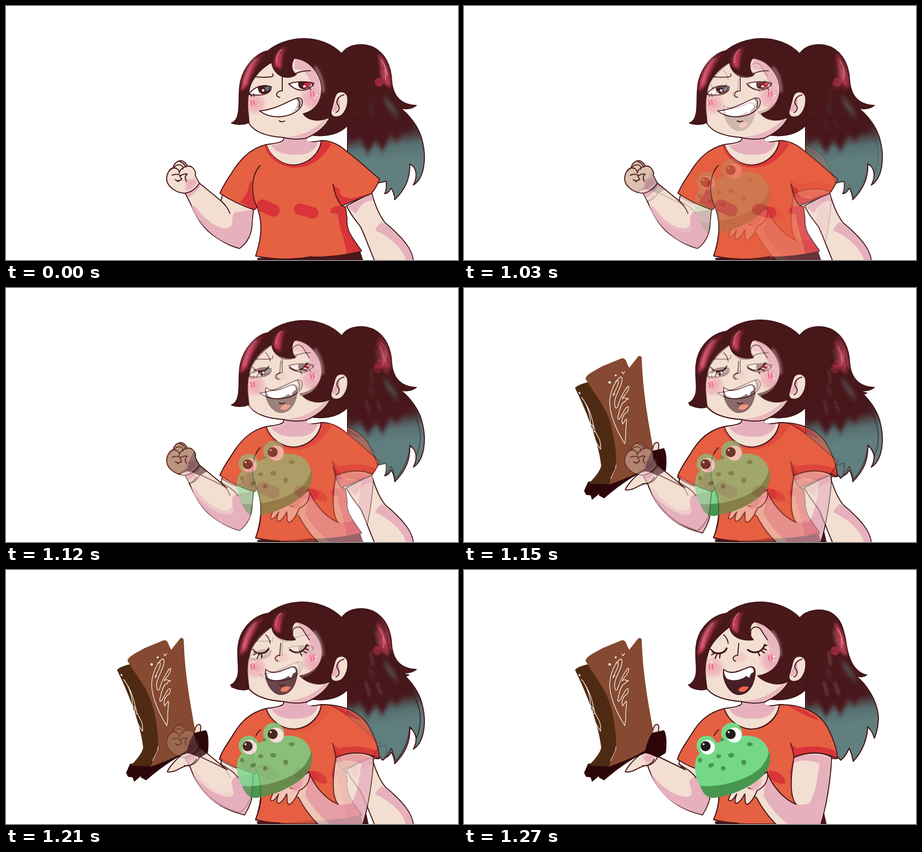
Animation, 900 px wide and 506 px high, one loop 2.27 s. Source, as an HTML page:

```html
<!DOCTYPE html>
<html lang="en">
<head>
<meta charset="utf-8">
<title>Two poses</title>
<style>
html, body { margin: 0; width: 100%; height: 100%; overflow: hidden; background: #fff; }
svg { display: block; width: 100vw; height: 100vh; }
.ln { fill: none; }
.ink, .ln { stroke: #421619; stroke-width: 2; stroke-linecap: round; stroke-linejoin: round; }
.skin { fill: #f3dfd2; }
.pink { fill: #e7b0bd; }
.hair { fill: #48181b; }
.shirt { fill: #e66042; }
.red { fill: #d93438; }
.white { fill: #fff; }
.mark { fill: none; stroke: #ee4a6c; stroke-width: 1.7; stroke-linecap: round; }
.soft { filter: url(#blur); }
.scroll { fill: none; stroke: #f6ebe2; stroke-width: 1.4; stroke-linecap: round; stroke-linejoin: round; }

/* the second pose dissolves over the first in ten 30 ms steps */
#first { animation: leave 2270ms step-end infinite; }
#second { animation: fade 2270ms step-end infinite; }
#fresh { animation: arrive 2270ms step-end infinite; }
@keyframes leave { 0% { opacity: 1; } 55.93%, 100% { opacity: 0; } }
@keyframes arrive { 0% { opacity: 0; } 50.65%, 100% { opacity: 1; } }
@keyframes fade {
  0% { opacity: 0; }
  44.04% { opacity: .1; animation-timing-function: steps(9, end); }
  55.93%, 100% { opacity: 1; }
}
</style>
</head>
<body>
<svg viewBox="0 0 900 506" preserveAspectRatio="none">
<defs>
  <filter id="blur" x="-50%" y="-50%" width="200%" height="200%"><feGaussianBlur stdDeviation="2.5"/></filter>
  <filter id="haze" x="-50%" y="-50%" width="200%" height="200%"><feGaussianBlur stdDeviation="3 6"/></filter>
  <linearGradient id="tail" gradientUnits="userSpaceOnUse" x1="742" y1="236" x2="750" y2="308">
    <stop offset="0" stop-color="#48181b"/><stop offset=".25" stop-color="#49282b"/>
    <stop offset=".65" stop-color="#587071"/><stop offset="1" stop-color="#617f7f"/>
  </linearGradient>
  <radialGradient id="blush">
    <stop offset="0" stop-color="#eda3b0" stop-opacity=".95"/><stop offset=".6" stop-color="#eeb2bb" stop-opacity=".7"/>
    <stop offset="1" stop-color="#f3dfd2" stop-opacity="0"/>
  </radialGradient>
  <linearGradient id="shine" x1="0" y1="1" x2="1" y2="0">
    <stop offset="0" stop-color="#cf3f5d"/><stop offset=".5" stop-color="#b93550"/><stop offset="1" stop-color="#48181b"/>
  </linearGradient>

  <path id="faceA" d="M484 234C482 214 480 190 484 168C487 148 505 125 529 112C531 130 545 142 560 142C567 142 574 140 578 136C568 131 566 116 574 104C602 106 625 132 628 160C630 186 616 209 592 215C601 228 623 232 645 221C638 238 621 253 598 263Q575 268 553 262C522 260 495 252 484 234Z"/>
  <path id="faceB" d="M484 237C479 212 480 185 486 165C491 146 508 129 529 113C531 131 548 142 576 139C566 129 567 109 578 103C606 107 630 137 630 164C630 187 611 207 585 211C599 225 627 233 647 221C638 239 621 253 598 263Q575 268 553 262C522 260 497 253 484 237Z"/>
  <path id="tailA" d="M667 97C680 75 710 73 731 82C756 95 767 121 768 150C771 181 787 197 817 198C807 206 794 206 784 203C804 216 824 245 829 269C838 306 832 344 811 357C820 340 818 321 804 315C805 342 796 364 774 386C774 377 770 367 767 363C763 370 760 373 754 374C759 365 757 356 757 349L739 353L680 300V236L650 230Z"/>
  <path id="tailB" d="M667 97C681 79 711 75 732 86C752 99 755 118 760 140C764 174 775 204 802 209C795 214 785 213 779 210C803 229 822 260 825 291C825 308 822 324 817 335C814 325 809 317 804 312C802 341 791 364 775 381C773 368 770 361 767 355C761 367 757 374 750 379L680 300V236L650 230Z"/>
  <clipPath id="inFaceA"><use href="#faceA"/></clipPath>
  <clipPath id="inFaceB"><use href="#faceB"/></clipPath>
  <clipPath id="inTailA"><use href="#tailA"/></clipPath>
  <clipPath id="inTailB"><use href="#tailB"/></clipPath>

  <!-- parts both poses share -->
  <g id="neck">
    <path class="skin ink" d="M553 250V265C553 272 534 274 518 276C526 302 552 317 573 317C604 315 625 292 628 268C614 271 597 273 597 267L602 250Z"/>
    <path class="pink" d="M554 262L597 262C598 273 613 271 621 272C616 284 608 292 594 295C565 299 538 295 528 277C545 276 556 272 554 262Z"/>
  </g>
  <g id="shines">
    <path class="soft" fill="url(#shine)" d="M468 170C469 132 489 100 521 90C508 104 491 126 481 158Z"/>
    <path class="soft" fill="none" stroke="#e9b3ba" stroke-width="3" opacity=".7" d="M475 156C479 133 487 116 499 104"/>
    <path class="soft" fill="url(#shine)" d="M535 119C532 98 545 81 563 82C551 91 547 110 548 126Z"/>
    <path fill="none" stroke="#e8909d" stroke-width="2" opacity=".75" d="M539 113C538 99 543 91 550 86"/>
    <path class="soft" fill="none" stroke="#e3bdc0" stroke-width="4" opacity=".7" d="M615 121Q631 140 632 172"/>
  </g>
  <g id="ear">
    <path class="skin ink" d="M655 181C659 168 675 167 680 180C683 199 673 222 657 221C649 221 645 215 648 207Z"/>
    <path class="pink" d="M650 211C662 210 668 196 662 181C655 187 654 201 648 208Z"/>
    <path class="ln" d="M673 177C661 179 656 191 661 197C665 201 664 209 657 212"/>
  </g>
  <g id="tailShine">
    <path class="soft" fill="#b23a50" d="M741 94C757 106 768 137 766 163C753 157 744 145 746 128Z"/>
    <circle fill="#a92c45" cx="743" cy="152" r="9" opacity=".8"/>
    <path fill="none" stroke="#ecb0b5" stroke-width="1.5" opacity=".75" d="M748 108Q757 122 759 139M755 125L756 146"/>
  </g>
  <g id="streaks" filter="url(#haze)">
    <path fill="#48181b" d="M681 232L800 228L808 252L791 250L778 268L765 254L750 290L736 266L720 294L704 258L684 272Z"/>
    <path fill="#627f80" opacity=".65" d="M750 180C762 188 775 205 782 221C769 214 756 198 750 180ZM722 190L733 215L726 207Z"/>
  </g>

  <g id="poseA">
    <use href="#tailA" class="ink" fill="url(#tail)"/>
    <g clip-path="url(#inTailA)"><use href="#streaks"/><use href="#tailShine"/></g>
    <path class="hair ink" d="M669 96C650 75 619 64 590 65C560 66 536 77 522 89C497 94 474 121 467 150C462 170 466 198 462 215C460 226 456 231 449 233C461 238 475 236 484 232L600 256C634 262 662 257 681 237L690 130Z"/>
    <!-- far arm -->
    <path class="skin ink" d="M678 398C686 416 699 430 706 440C714 456 724 485 735 510H811C811 483 783 455 755 432C743 417 735 397 728 372Z"/>
    <path class="pink" d="M680 400L726 375L730 388C715 387 704 398 697 414ZM748 430C785 457 808 483 810 506H796C791 484 764 459 735 447C738 439 742 436 748 430Z"/>
    <path class="hair" d="M500 502L705 488L711 506H501Z"/>
    <!-- near arm and fist -->
    <path class="skin ink" d="M355 371C369 391 375 422 402 448C422 466 448 479 465 483C482 471 490 452 490 432L493 402L431 376L428 388L384 352Z"/>
    <path class="pink" d="M369 397L378 400C394 425 421 444 440 443C458 439 445 420 456 411L490 406C492 443 482 472 465 481C422 473 382 435 369 397ZM356 371L384 352L388 358C379 367 372 379 363 381Z"/>
    <path class="ln" d="M428 388C435 395 442 402 446 413"/>
    <path class="skin ink" d="M355 373C340 372 323 362 320 347C319 335 325 325 333 322C335 311 347 304 355 311Q360 315 361 319C371 317 379 328 377 338L385 353C379 363 368 372 355 373Z"/>
    <path class="pink soft" d="M358 342Q369 350 378 340L381 352Q369 366 358 369Z"/>
    <path class="ln" d="M325 329C334 317 346 325 345 333M335 321C343 313 354 316 352 325M346 310Q355 313 358 321M331 337C338 334 345 335 348 338Q355 333 361 335Q354 340 359 349M345 332C348 322 360 317 369 320M337 346Q344 351 350 345L346 339M337 346L343 350"/>
    <use href="#neck"/>
    <!-- shirt -->
    <path class="shirt ink" d="M518 276C484 284 464 309 449 333C439 348 431 360 426 373C445 386 470 398 494 406L500 401C510 426 511 457 497 498C530 505 570 506 604 500C640 501 681 496 708 488C688 460 677 447 679 424L676 400L668 398L727 374Q737 363 744 345C724 328 704 309 680 291C664 276 648 268 628 268C624 297 601 316 573 317C550 317 525 300 518 276Z"/>
    <path class="red" d="M515 278C521 304 548 321 573 322C610 323 631 301 648 275Q638 269 629 270C624 296 602 316 573 318C548 316 526 299 519 277Z"/>
    <path class="red" d="M490 347C479 356 488 369 466 391L494 405L499 400C490 385 488 368 490 347ZM652 357L665 365C662 379 676 383 690 383L729 372L668 397C659 384 654 370 652 357ZM660 398L675 401L678 427C677 446 688 461 707 488L679 493C674 465 663 441 661 415L646 412Q645 401 660 398Z"/>
    <rect class="red" x="498" y="390" width="48" height="25" rx="12.500" transform="rotate(24 522 402)"/>
    <rect class="red" x="573" y="397" width="50" height="23" rx="11.500" transform="rotate(16 598 408)"/>
    <path class="ln" d="M506 318C489 335 486 374 500 401M651 355C654 374 660 388 668 398M604 500L607 499"/>
    <!-- face -->
    <use href="#faceA" class="skin ink"/>
    <g clip-path="url(#inFaceA)">
      <path class="pink" d="M576 106C602 108 623 134 625 160C627 180 617 199 608 204C616 180 611 148 592 128L574 126ZM554 261C586 260 613 248 633 228L641 224C631 241 616 253 598 262Q573 266 554 261Z" opacity=".85"/>
      <ellipse fill="url(#blush)" cx="496" cy="195" rx="27" ry="26"/><ellipse fill="url(#blush)" cx="608" cy="181" rx="27" ry="31"/>
    </g>
    <use href="#shines"/><use href="#ear"/>
    <path class="white ink" d="M483 176C494 160 514 155 528 161C529 173 514 181 483 176ZM563 155C579 149 600 150 613 154C603 171 579 173 563 155Z"/>
    <path class="hair" d="M502 160Q515 157 526 161C528 171 518 176 509 175Q500 171 502 160ZM582 152Q596 150 608 154C602 168 587 169 582 159Z"/>
    <path fill="#557d85" d="M514 162L524 160Q526 167 519 170Z"/><path fill="#cb2848" d="M594 153L608 153Q603 162 596 164Z"/>
    <circle class="white" cx="512" cy="168" r="2.500"/><circle class="white" cx="594" cy="160" r="2.500"/>
    <path class="ln" d="M486 175L489 180M493 175L494 180M603 162L607 167M609 155L612 159M497 141Q514 143 529 141Q533 140 531 135M571 137Q588 128 606 129M550 142V168M550 169C539 168 534 180 545 182M544 229Q550 232 555 229"/>
    <path class="white ink" d="M505 209C541 205 558 191 578 184C591 179 594 194 584 205C566 223 528 227 505 209Z"/>
    <path fill="#c9c4c4" d="M582 184C592 183 590 196 583 204L568 213C579 203 583 194 579 186Z"/>
    <path class="ln" d="M579 184Q588 190 583 202"/>
    <path class="mark" d="M487 188L489 198M493 187L494 196M606 170L608 180M612 170L613 179"/>
    <path class="white" d="M484 191h2v3h-2zM617 177h3v3h-3zM614 183h2v2h-2z"/>
  </g>

  <g id="poseB">
    <use href="#tailB" class="ink" fill="url(#tail)"/>
    <g clip-path="url(#inTailB)">
      <use href="#streaks"/><use href="#tailShine" x="-4" y="9"/>
      <path fill="none" stroke="#a78988" stroke-width="4" opacity=".45" class="soft" d="M726 163L730 190M716 222L724 251M738 224L747 248M736 120L741 146"/>
    </g>
    <path class="hair ink" d="M669 96C650 75 616 62 583 64C556 66 536 76 523 86C491 91 465 119 462 153C459 176 467 202 459 217Q454 227 447 229C455 239 475 241 486 236L600 256C634 262 662 257 681 237L690 130Z"/>
    <path class="hair" d="M499 501L714 470L722 506H501Z"/>
    <!-- arm under the boots -->
    <path class="skin ink" d="M364 384C374 420 397 452 428 470Q449 482 475 488C484 474 491 456 492 438L493 400L429 375L428 386Q434 393 441 398L385 371Z"/>
    <path class="pink" d="M372 405C397 439 431 455 448 451C463 444 440 425 454 414L490 402C493 443 486 470 475 486C422 476 388 447 372 405Z"/>
    <path class="ln" d="M428 387C442 395 455 403 462 414"/>
    <use href="#neck"/>
    <!-- shirt -->
    <path class="shirt ink" d="M518 276C486 284 468 302 455 324C443 344 431 358 425 377C444 390 470 400 494 405L504 415C511 445 508 473 497 497Q532 507 575 506H712L714 470L680 373L743 376C744 358 733 331 724 314C707 282 671 268 628 268C624 297 601 316 573 317C550 317 525 300 518 276Z"/>
    <path class="red" d="M650 347L664 355Q704 346 739 360L742 374Q700 358 657 372ZM606 400C622 399 642 409 639 425Q626 429 610 415ZM649 401L656 374L665 376L667 470L652 451ZM645 270C672 273 698 289 708 300Q680 292 664 281Z"/>
    <path class="ln" d="M507 318Q501 323 498 330M650 345Q655 358 657 373C687 360 718 362 743 376M497 497Q515 503 545 504"/>
    <!-- arm holding the frog -->
    <path class="skin ink" d="M657 374C686 361 715 363 732 373C730 420 721 472 710 508H623C609 495 593 474 583 454L563 440L603 402C614 431 638 458 661 467C648 449 650 413 657 374Z"/>
    <path class="pink" d="M658 374Q696 360 730 375C729 421 719 470 709 506H645C628 494 610 474 596 449L604 406C615 434 640 460 664 468L687 466C701 445 704 410 708 386Q680 374 657 384Z"/>
    <path class="ln" d="M603 402C614 432 638 458 662 467"/>
    <path class="skin ink" d="M532 444C529 451 524 459 529 460Q535 460 543 446C540 455 537 464 543 465Q551 462 559 446C561 455 557 465 564 467Q573 464 584 439C600 432 607 417 604 402L582 417Z"/>
    <path class="ln" d="M566 434Q577 439 582 428"/><path class="pink soft" d="M566 426L594 415Q591 436 574 441Z"/>
    <!-- face -->
    <use href="#faceB" class="skin ink"/>
    <g clip-path="url(#inFaceB)">
      <path class="pink" opacity=".85" d="M579 105C606 109 629 137 629 164C628 183 614 197 606 200C614 176 609 146 594 126ZM554 261C586 260 613 248 633 228L643 224C632 241 616 253 598 262Q573 266 554 261Z"/>
      <ellipse fill="url(#blush)" cx="496" cy="194" rx="27" ry="26"/><ellipse fill="url(#blush)" cx="609" cy="181" rx="25" ry="28"/><ellipse fill="url(#blush)" opacity=".45" cx="551" cy="174" rx="18" ry="14"/>
    </g>
    <path class="hair" d="M548 128Q559 143 576 139Q567 130 571 117L561 105Z"/>
    <path class="ln" d="M571 128C568 111 588 109 593 122L604 139M517 129Q525 136 526 146M547 146L545 170C536 170 532 179 541 182"/>
    <use href="#shines" x="-2"/><use href="#ear" y="1"/>
    <path class="ln" style="stroke-width:3.500" d="M495 163C506 169 519 166 523 156M565 159C579 169 594 163 599 149"/>
    <path class="ln" style="stroke-width:2.500" d="M498 164L491 158M499 166L493 169M504 167L500 176M510 168L509 175M586 165L589 171M592 161L598 165M596 157L602 159M599 151L603 150"/>
    <path class="ink" fill="#472027" d="M517 198C533 211 550 199 569 193C579 191 581 200 579 211C575 236 562 249 545 248C526 244 514 218 517 198Z"/>
    <path class="white" d="M518 200C535 212 551 200 569 194Q577 193 577 203L571 207L568 215L562 211C552 220 533 222 523 216Q517 207 518 200Z"/>
    <path fill="#ee6545" d="M546 241Q549 229 567 233Q562 242 554 243Z"/>
    <path class="mark" d="M488 188L490 198M494 187L495 197M606 170L608 180M612 169L613 179"/>
    <path class="white" d="M485 184h2v2h-2zM492 182h3v3h-3zM616 171h3v3h-3zM616 179h2v3h-2z"/>
    <!-- hand and boots -->
    <path class="skin ink" d="M321 402C325 392 341 374 354 366L376 320C378 306 387 304 388 313L384 355L386 371C380 386 369 390 359 390C347 393 335 405 321 402Z"/>
    <path class="pink soft" d="M355 369L380 364Q382 381 364 386Z"/><path class="ln" d="M355 390Q371 391 379 377"/>
    <path fill="#2c060a" d="M247 386L300 380L286 402L274 406L255 422L252 413L243 412L239 404Z"/>
    <path fill="#2c060a" d="M282 384L350 360L372 325L398 319C404 326 404 349 402 364L386 374L370 367L361 365C334 374 299 402 279 419L268 413Z"/>
    <path fill="#4f2a13" d="M221 199C226 193 238 190 249 187L298 253L306 333L301 360L286 391L248 390C263 375 273 361 273 353C267 302 242 242 221 199Z"/>
    <path fill="#854a31" d="M242 181C243 172 260 165 275 156L314 140Q321 138 325 151L329 159L347 136Q354 133 354 142C356 207 367 267 377 321Q365 338 361 359C343 371 307 386 287 392L303 357C304 325 298 286 287 256C276 229 257 207 242 181Z"/>
    <path class="scroll" d="M320 310C299 276 285 239 292 213C296 194 306 179 313 177C319 185 307 204 302 218C297 232 302 246 306 236C313 212 330 187 328 199C326 211 315 216 315 221C321 216 326 219 321 226C311 229 309 249 306 258C307 268 313 255 318 246C326 231 330 235 325 247C315 252 313 265 316 271C322 263 325 253 323 273C321 290 323 302 320 310"/>
    <path class="scroll" d="M302 186Q310 180 306 194L298 211Q295 219 300 210M314 167L317 171L320 166M229 208L231 211M234 218C246 232 252 255 252 271C259 273 257 282 255 287C263 282 264 293 268 298C273 307 272 315 272 321C261 307 258 296 256 289M241 228C253 247 256 266 261 286"/>
    <g fill="#f6ebe2"><circle cx="290" cy="188" r="2.500"/><circle cx="302" cy="174" r="2"/><circle cx="326" cy="221" r="1.800"/><circle cx="230" cy="209" r="1.800"/></g>
    <!-- frog -->
    <g fill="#74d888">
      <circle cx="483" cy="350" r="20"/><circle cx="533" cy="325" r="21"/>
      <path d="M461 381C464 364 484 352 512 341C546 327 587 323 602 350C616 375 604 398 581 412C550 432 502 439 470 430C461 414 458 397 461 381Z"/>
    </g>
    <path fill="#48964f" d="M470 430C500 433 537 425 564 412C592 398 602 383 608 360C613 382 606 399 593 412C568 435 529 450 499 454C480 455 475 441 470 430Z"/>
    <g class="white"><circle cx="485" cy="353" r="14.500"/><circle cx="538" cy="329" r="15"/></g>
    <g fill="#211b1c"><circle cx="481" cy="351" r="10"/><circle cx="531" cy="327" r="10"/></g>
    <g class="white"><circle cx="477" cy="347" r="2"/><circle cx="527" cy="323" r="2"/></g>
    <g fill="#48964f">
      <ellipse cx="514" cy="338" rx="4" ry="3"/><ellipse cx="569" cy="347" rx="6" ry="4"/><ellipse cx="532" cy="369" rx="6" ry="4.500"/>
      <ellipse cx="557" cy="383" rx="5" ry="5.500"/><ellipse cx="492" cy="389" rx="6" ry="4" transform="rotate(-25 492 389)"/>
      <ellipse cx="516" cy="395" rx="4.500" ry="4.500"/><ellipse cx="507" cy="371" rx="5" ry="4"/><ellipse cx="470" cy="379" rx="4" ry="5"/>
    </g>
  </g>

  <mask id="shape" maskUnits="userSpaceOnUse" x="0" y="0" width="900" height="506" style="mask-type:alpha"><use href="#poseA"/></mask>
</defs>
<g id="fresh"><use href="#poseB"/></g>
<g id="first"><use href="#poseA"/></g>
<g mask="url(#shape)"><g id="second"><use href="#poseB"/></g></g>
</svg>
</body>
</html>
```
